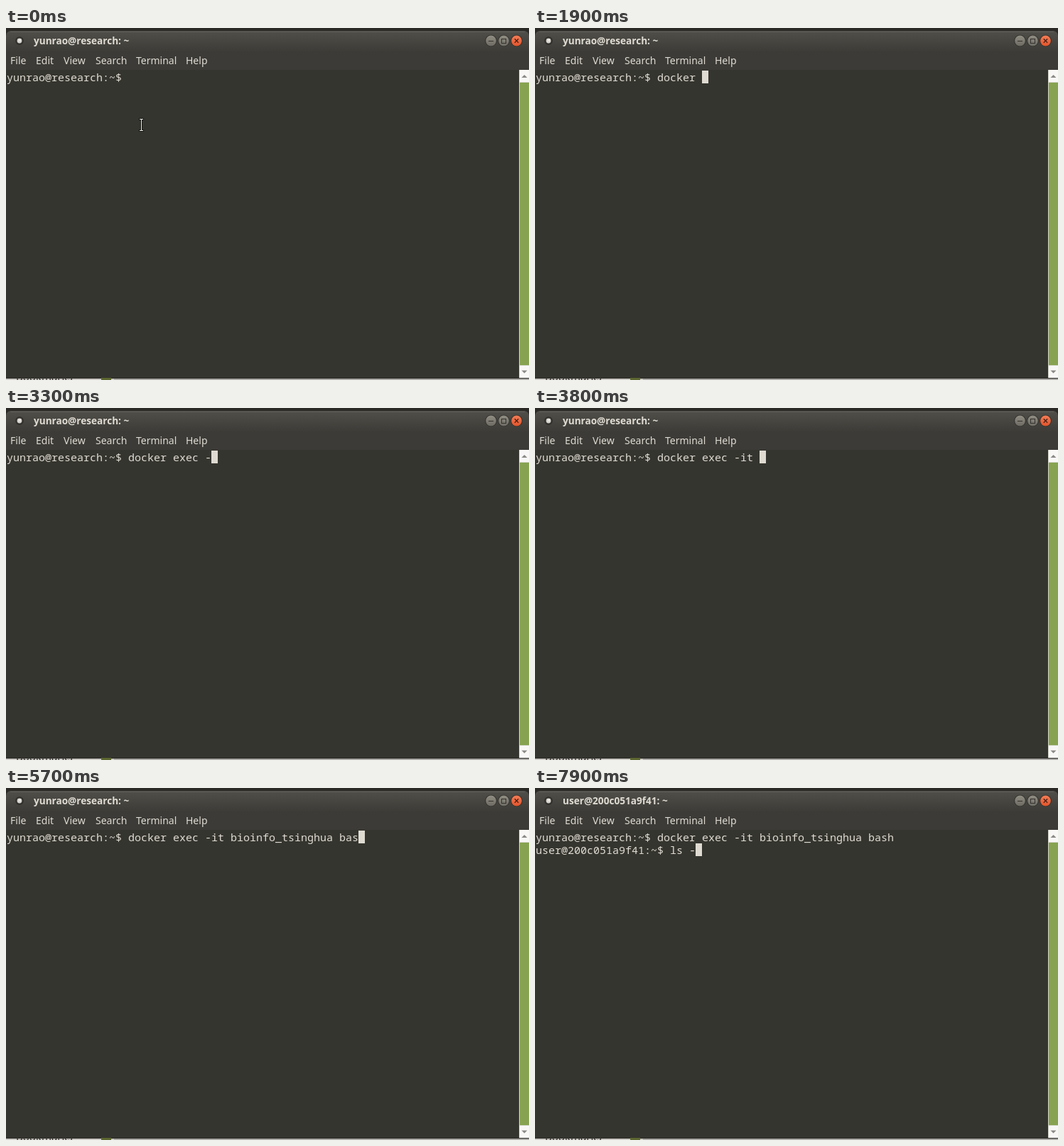
These frames come from a looping animation (736 by 496 pixels, 8 s). An HTML page with a canvas:

```html
<!DOCTYPE html>
<html lang="en">
<head>
<meta charset="utf-8">
<title>Terminal</title>
<style>
html, body { margin: 0; width: 100%; height: 100%; overflow: hidden; background: #2b2a27; }
canvas { display: block; }
</style>
</head>
<body>
<canvas id="stage" width="736" height="496"></canvas>
<script>
const ctx = document.getElementById('stage').getContext('2d');
const LOOP = 8000, CELL = 9, ROW = 18, LEFT = 1, TOP = 60;
const SANS = '"Noto Sans", "Open Sans", sans-serif';
const MONO = '15px "Noto Sans Mono", "DejaVu Sans Mono", monospace';
const INK = '#dfdbd2', BACK = '#35352f';

const HOST = 'yunrao@research:', BOX = 'user@200c051a9f41:';
const COMMAND = 'docker exec -it bioinfo_tsinghua bash';
const LIST = 'ls -';
const ENTER = 6400, READY = 6600;

// [time, characters typed]
const keys = [
  [800, 1], [1000, 2], [1300, 3], [1400, 4], [1600, 5], [1700, 6],
  [1900, 7], [2000, 8], [2200, 9], [2400, 10], [2600, 11], [2800, 12],
  [3300, 13], [3500, 14], [3600, 15], [3800, 16], [4400, 17], [4600, 18],
  [4900, 32], [5300, 33], [5500, 34], [5600, 35], [5700, 36], [5800, 37]
];
const listKeys = [[7400, 1], [7500, 2], [7800, 3], [7900, 4]];

const typed = (list, t) => list.reduce((n, [at, count]) => t >= at ? count : n, 0);

function rect(x, y, w, h, fill) {
  ctx.fillStyle = fill;
  ctx.fillRect(x, y, w, h);
}

function text(str, x, y, font, fill = INK) {
  ctx.font = font;
  ctx.fillStyle = fill;
  ctx.fillText(str, x, y);
}

function disc(x, y, r, fill) {
  ctx.fillStyle = fill;
  ctx.beginPath();
  ctx.arc(x, y, r, 0, Math.PI * 2);
  ctx.fill();
}

function line(points, color, width = 1) {
  ctx.strokeStyle = color;
  ctx.lineWidth = width;
  ctx.beginPath();
  points.forEach(([x, y], i) => i ? ctx.lineTo(x, y) : ctx.moveTo(x, y));
  ctx.stroke();
}

function shade(y0, y1, from, to) {
  const g = ctx.createLinearGradient(0, y0, 0, y1);
  g.addColorStop(0, from);
  g.addColorStop(1, to);
  return g;
}

function button(x, from, to) {
  disc(x, 18, 8.3, '#2f2e2a');
  disc(x, 18, 7.4, shade(10, 26, from, to));
}

function drawButtons() {
  button(682.5, '#918e84', '#6b6961');
  button(700.5, '#918e84', '#6b6961');
  button(718.5, '#f37e58', '#e2532a');
  line([[679, 18.5], [686, 18.5]], '#33322d');
  ctx.strokeRect(697.5, 15.5, 6, 6);
  line([[715.8, 15.3], [721.2, 20.7]], '#4a2015', 1.3);
  line([[721.2, 15.3], [715.8, 20.7]], '#4a2015', 1.3);
}

function arrow(y, dir) {
  ctx.fillStyle = '#8b8985';
  ctx.beginPath();
  ctx.moveTo(725.5, y + 2 * dir);
  ctx.lineTo(733.5, y + 2 * dir);
  ctx.lineTo(729.5, y - 2 * dir);
  ctx.fill();
}

function drawScrollbar() {
  rect(722, 59, 14, 434, '#d3d5c8');
  rect(723, 59, 13, 17, '#f8f7f6');
  rect(723, 77, 13, 398, '#87a351');
  rect(723, 476, 13, 17, '#f8f7f6');
  arrow(68, 1);
  arrow(484.5, -1);
}

// Sliver of the window lying behind
function drawBehind() {
  rect(0, 493, 736, 1, '#2e2d2a');
  rect(0, 494, 736, 2, '#aaa8a4');
  rect(0, 494, 152, 2, '#cbc8c3');
  ctx.save();
  ctx.beginPath();
  ctx.rect(0, 493, 152, 3);
  ctx.clip();
  text('Bookmarks', 14, 497, '15px ' + SANS, '#33322f');
  rect(134, 493, 14, 3, '#5c6630');
  ctx.restore();
}

function drawWindow(title) {
  rect(0, 0, 736, 496, '#2b2a27');
  ctx.fillStyle = shade(4, 34, '#504f49', '#3c3b37');
  ctx.beginPath();
  ctx.roundRect(0, 4, 736, 60, [7, 7, 0, 0]);
  ctx.fill();
  rect(6, 5, 724, 1, '#605e57');
  rect(0, 59, 722, 434, BACK);

  disc(19, 18, 6, '#33322e');
  disc(19, 18, 3.4, '#d8d5ce');
  disc(19.5, 17, 1.6, '#f0eeea');
  text(title, 39, 23, '600 13.6px ' + SANS);
  drawButtons();

  const menu = { File: 6, Edit: 42, View: 81, Search: 126, Terminal: 183, Help: 253 };
  for (const name in menu) text(name, menu[name], 51, '14px ' + SANS);
  drawScrollbar();
  drawBehind();
}

function drawPointer() {
  const beam = [[190.5, 129], [190.5, 144]];
  const caps = [128.5, 144.5];
  line(beam, '#171714', 3);
  caps.forEach(y => line([[187, y], [194, y]], '#171714', 3));
  line(beam, '#f2f2f0');
  caps.forEach(y => line([[188, y], [193, y]], '#f2f2f0'));
}

const row = (str, n) => text(str, LEFT, TOP + n * ROW + 15, MONO);
const cursor = (col, n) => rect(LEFT + col * CELL, TOP + n * ROW, CELL, ROW, INK);

function draw(t) {
  const inside = t >= READY;
  drawWindow((inside ? BOX : HOST) + ' ~');

  const first = HOST + '~$ ' + COMMAND.slice(0, typed(keys, t));
  row(first, 0);
  if (inside) {
    const second = BOX + '~$ ' + LIST.slice(0, typed(listKeys, t));
    row(second, 1);
    if (t < 7000 || t >= 7400) cursor(second.length, 1);
  } else if (t >= ENTER) {
    cursor(0, 1);
  } else if (t >= 300) {
    cursor(first.length, 0);
  }
  if (t < 800) drawPointer();
}

const start = performance.now();
function tick() {
  draw((performance.now() - start) % LOOP);
  requestAnimationFrame(tick);
}
tick();
</script>
</body>
</html>
```
